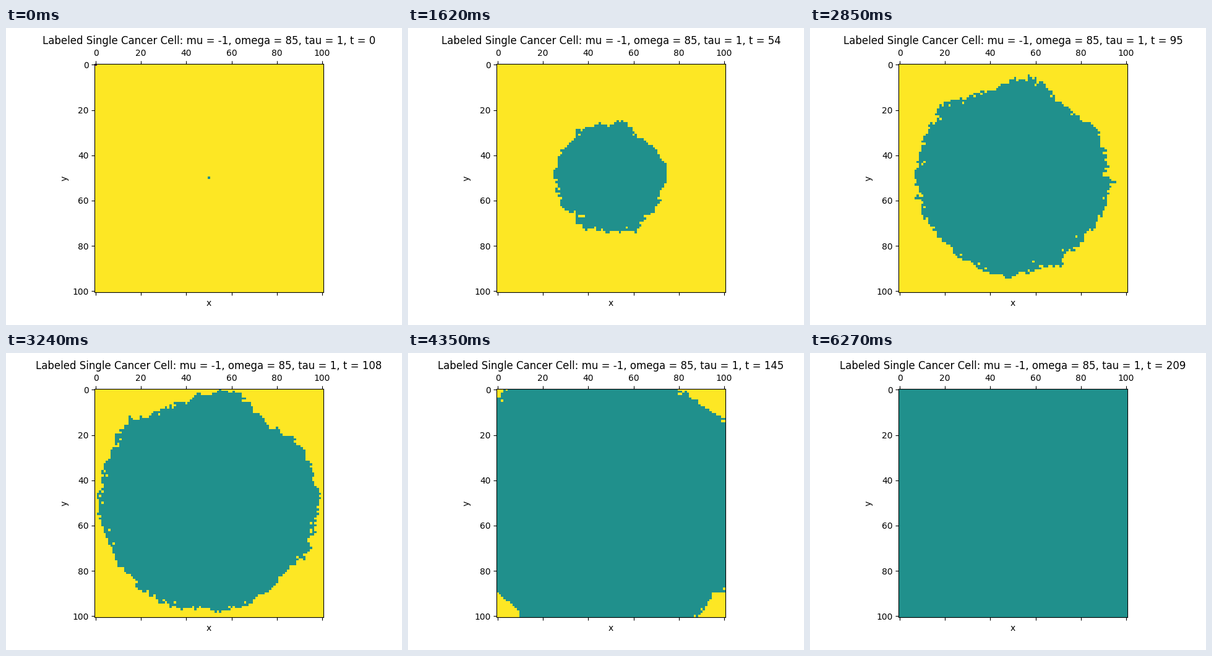
These frames come from a looping animation (640x480 px, 6.3 s). A matplotlib script:

```python
import numpy as np
import matplotlib.pyplot as plt
from matplotlib.animation import FuncAnimation

N, FRAMES, STEP_MS = 101, 210, 30
MID = N // 2
MARK, CANCER, HEALTHY = 0, 1, 2
SPEED = 0.44  # cells per step
LAST = 175
TITLE = "Labeled Single Cancer Cell: mu = -1, omega = 85, tau = 1, t = {}"

# Directions that grow faster or slower: angle, relative speed, width.
LOBES = [(282, 0.06, 8), (303, -0.08, 10), (317, -0.05, 9),
         (225, 0.06, 10), (250, -0.05, 10), (44, -0.04, 10)]


def front_speed(angle):
    factor = 1.0
    for centre, gain, width in LOBES:
        gap = (angle - centre + 180) % 360 - 180
        factor = factor + gain * np.exp(-(gap / width) ** 2)
    return SPEED * factor


def neighbours(a, fill):
    p = np.pad(a, 1, constant_values=fill)
    return [p[:-2, 1:-1], p[2:, 1:-1], p[1:-1, :-2], p[1:-1, 2:]]


def clumps(rng, shape, passes=4):
    """Unit noise that varies over a few cells."""
    a = rng.normal(size=shape)
    for _ in range(passes):
        a = (a + sum(neighbours(a, 0))) / 5
    return a / a.std()


def grow():
    """Ragged arrival times; a cell needs an infected neighbour first."""
    rng = np.random.default_rng(85)
    y, x = np.mgrid[:N, :N] - MID
    t = np.hypot(x, y) / front_speed(np.degrees(np.arctan2(y, x)))
    t += 1.6 * clumps(rng, t.shape) + rng.normal(0, 0.9, t.shape)
    t += rng.exponential(1.4, t.shape) - 2.2
    t = np.maximum(t, 1)
    t[MID, MID] = 0
    for _ in range(120):
        first = np.minimum.reduce(neighbours(t, np.inf))
        t = np.maximum(t, first + 0.2)
        t[MID, MID] = 0
    return np.minimum(t, LAST)


arrival = grow()


def cells(t):
    grid = np.where(arrival <= t, CANCER, HEALTHY)
    if t == 0:
        grid[0, 0] = MARK
    return grid


fig, ax = plt.subplots(figsize=(6.4, 4.8), dpi=100)
image = ax.matshow(cells(0), cmap="viridis", vmin=MARK, vmax=HEALTHY)
title = ax.set_title(TITLE.format(0))
ax.set_xlabel("x")
ax.set_ylabel("y")


def update(t):
    image.set_data(cells(t))
    title.set_text(TITLE.format(t))
    return image, title


anim = FuncAnimation(fig, update, frames=FRAMES, interval=STEP_MS,
                     repeat=True, repeat_delay=0, blit=False)
plt.show()
```
